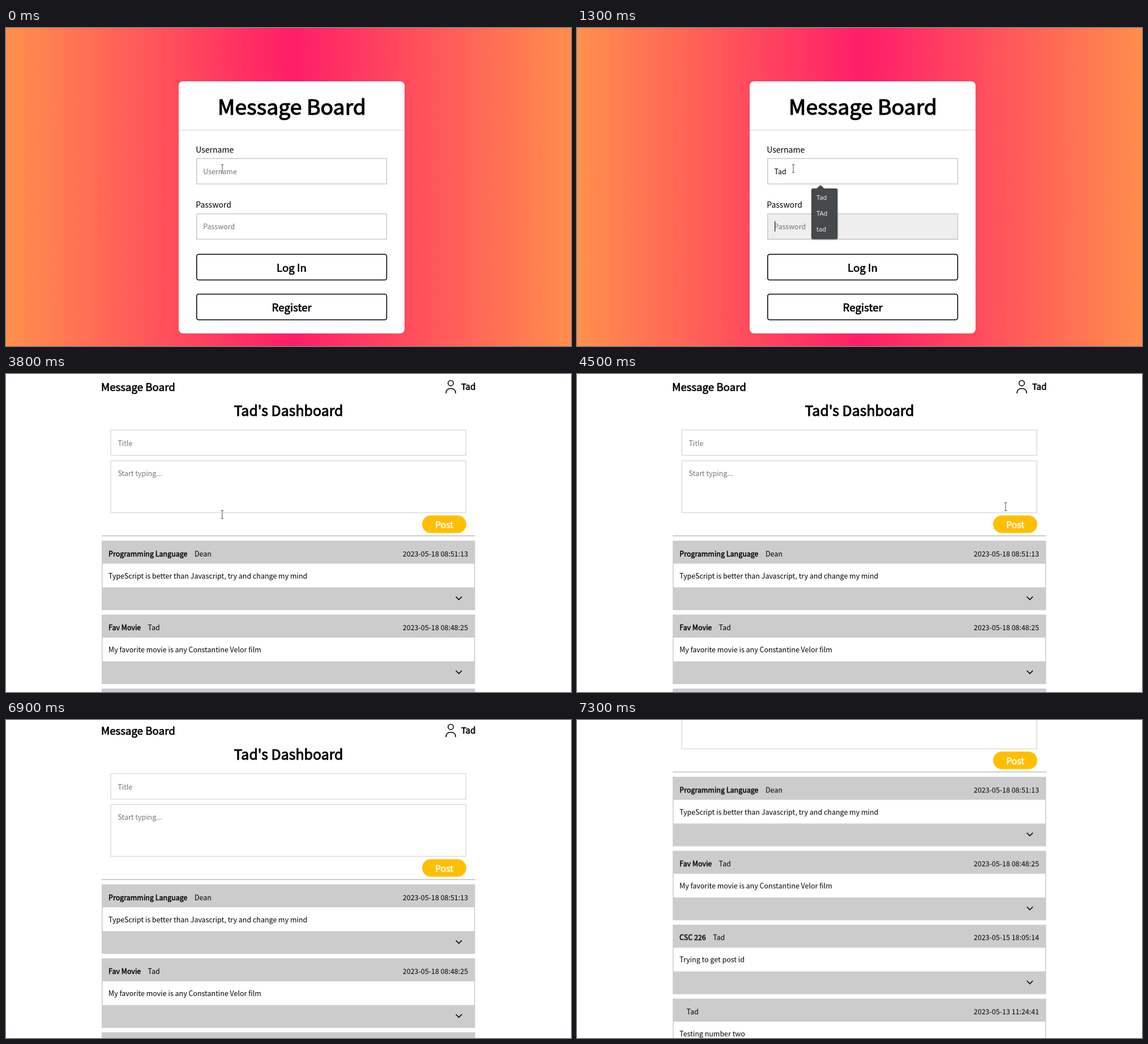
These frames come from a looping animation (998 px wide and 561 px high, 8 s). An HTML page:

```html
<!DOCTYPE html>
<html lang="en">
<head>
<meta charset="utf-8">
<title>Message Board</title>
<style>
html, body { margin: 0; width: 100%; height: 100%; overflow: hidden; background: #fff; }
svg { display: block; width: 998px; height: 561px; }
text { font: 12.475px "Noto Sans CJK JP", "Noto Sans CJK SC", "Noto Sans CJK", sans-serif; white-space: pre; }

/* regular outlines thickened, like a browser's synthetic bold */
.bold { stroke: currentColor; stroke-width: .037em; stroke-linejoin: round; }
.s14 { font-size: 14.03px; }
.s15 { font-size: 14.97px; }
.s16 { font-size: 15.6px; }
.s19 { font-size: 18.71px; }
.s25 { font-size: 24.95px; }
.s37 { font-size: 37.43px; stroke-width: .032em; }
.mid { text-anchor: middle; }
.end { text-anchor: end; }
.hint { fill: #757575; }
.field { fill: #fff; stroke: #ccc; stroke-width: 1.56; }
.pale { stroke: #ddd; }
.btn { fill: #fff; stroke: #000; stroke-width: 1.56; }
.line { fill: none; stroke: #000; stroke-width: 1.6; }
.menu text { font: 11.2px "Noto Sans", sans-serif; fill: #eee; }
.menu { filter: drop-shadow(0 1px 1px #0005); }

.anim { animation: 8s step-end infinite; }
.off { opacity: 0; }
.login { animation-name: login; }
.dash { animation-name: dash; }
.name-focus { animation-name: name-focus; }
.name-hint, .wide { animation-name: name-hint; }
.name-text, .narrow { animation-name: name-text; }
.name-caret { animation-name: name-caret; }
.pass-focus { animation-name: pass-focus; }
.pass-hint { animation-name: pass-hint; }
.pass-caret { animation-name: pass-caret; }
.menu { animation-name: menu; }
.page { animation-name: scroll; }
.pointer { animation-name: pointer; }
.beam { animation-name: beam; }
.arrow { animation-name: arrow; }

@keyframes login { 47.5% { opacity: 0; } }
@keyframes dash { 47.5% { opacity: 1; } }
@keyframes name-focus { 3.75% { opacity: 1; } 16.25% { opacity: 0; } }
@keyframes name-hint { 8.75% { opacity: 0; } }
@keyframes name-text { 8.75% { opacity: 1; } }
@keyframes name-caret {
  8.75% { transform: translateX(7px); }
  11.25% { transform: translateX(13.7px); }
  13.75% { transform: translateX(21.6px); }
}
@keyframes pass-focus { 16.25% { opacity: 1; } }
@keyframes pass-hint { 17.5% { opacity: 0; } }
@keyframes pass-caret {
  17.5% { transform: translateX(4.25px); }
  20% { transform: translateX(8.5px); }
  22.5% { transform: translateX(12.75px); }
  25% { transform: translateX(17px); }
  27.5% { transform: translateX(21.25px); }
  30% { transform: translateX(25.5px); }
  32.5% { transform: translateX(29.5px); }
}
@keyframes menu {
  3.75% { opacity: .95; }
  16.25% { opacity: .95; animation-timing-function: steps(4); }
  21.25% { opacity: 0; }
}
@keyframes scroll {
  86.25% { transform: translateY(-4px); }
  87.5% { transform: translateY(-45px); }
  88.75% { transform: translateY(-115px); }
  90% { transform: translateY(-170px); }
  91.25% { transform: translateY(-193.8px); }
}
@keyframes pointer {
  0% { transform: translate(382px, 248px); }
  48.75% { transform: translate(405px, 243px); }
  50% { transform: translate(455px, 232px); }
  51.25% { transform: translate(515px, 220px); }
  52.5% { transform: translate(568px, 210px); }
  55% { transform: translate(690px, 237px); }
  56.25% { transform: translate(757px, 234px); }
  63.75% { transform: translate(768px, 231px); }
  65% { transform: translate(785px, 224px); }
  66.25% { transform: translate(811px, 212px); }
  67.5% { transform: translate(845px, 199px); }
  68.75% { transform: translate(880px, 187px); }
  70% { transform: translate(899.5px, 180px); }
  75% { transform: translate(922px, 183px); }
  76.25% { transform: translate(957px, 181px); }
  77.5% { transform: translate(987.5px, 177px); }
  80%, 100% { transform: translate(1020px, 177px); }
}
@keyframes beam { 67.5% { opacity: 0; } }
@keyframes arrow { 67.5% { opacity: 1; } }
</style>
</head>
<body>
<svg viewBox="0 0 998 561">
  <defs>
    <linearGradient id="sunset" gradientUnits="userSpaceOnUse" x1="0" x2="1009">
      <stop offset="0" stop-color="#ff904c"/>
      <stop offset=".5" stop-color="#ff1d68"/>
      <stop offset="1" stop-color="#ff904c"/>
    </linearGradient>
  </defs>

  <g class="anim login">
    <rect width="998" height="561" fill="url(#sunset)"/>
    <rect x="305" y="94" width="399" height="444.7" rx="7.8" fill="#fff"/>
    <path d="M305 180.2H704" stroke="#ddd" stroke-width="1.2"/>
    <text class="bold mid s37" x="505" y="153">Message Board</text>

    <text class="s14" x="335.2" y="219.7">Username</text>
    <rect class="field" x="336.8" y="230.3" width="335.6" height="44.8"/>
    <rect class="field anim off name-focus" style="fill:#eee" x="336.8" y="230.3" width="335.6" height="44.8"/>
    <text class="anim off name-text" x="348.6" y="258">Tad</text>
    <g class="anim off name-focus">
      <g class="anim name-caret">
        <rect x="349" y="243" width="40" height="19" fill="#eee"/>
        <rect x="348.8" y="244" width="1.1" height="18"/>
      </g>
    </g>
    <text class="hint anim name-hint" x="348.2" y="258">Username</text>

    <text class="s14" x="335.2" y="317">Password</text>
    <rect class="field" x="336.8" y="327.8" width="335.6" height="44.8"/>
    <g class="anim off pass-focus">
      <rect class="field" style="fill:#eee" x="336.8" y="327.8" width="335.6" height="44.8"/>
      <path d="M351.3 351.6h25.6" fill="none" stroke="#000" stroke-width="3.6" stroke-linecap="round" stroke-dasharray="0 4.25"/>
      <g class="anim pass-caret">
        <rect x="349.2" y="340" width="40" height="20" fill="#eee"/>
        <rect x="349" y="341" width="1.1" height="18"/>
      </g>
    </g>
    <text class="hint anim pass-hint" x="348.2" y="355.4">Password</text>

    <rect class="btn" x="336.8" y="399.3" width="335.6" height="45.2" rx="3.5"/>
    <text class="bold mid s19" x="504.5" y="429.7">Log In</text>
    <rect class="btn" x="336.8" y="469.5" width="335.6" height="45.2" rx="3.5"/>
    <text class="bold mid s19" x="504.7" y="499.9">Register</text>

    <g class="anim off menu">
      <path d="M423 283.5L430 277L437 283.5Z" fill="#3b4043"/>
      <g class="anim wide">
        <rect x="414" y="283" width="177" height="173" rx="3" fill="#3b4043"/>
        <text x="423" y="386.6">Dean</text>
        <text x="423" y="414.4">message board tester</text>
        <text x="423" y="442.2">test</text>
      </g>
      <rect class="anim off narrow" x="414" y="283" width="46.3" height="89.5" rx="3" fill="#3b4043"/>
      <text x="423" y="303">Tad</text>
      <text x="423" y="330.9">TAd</text>
      <text x="423" y="358.8">tad</text>
    </g>
  </g>

  <g class="anim off dash">
    <rect width="998" height="561" fill="#fff"/>
    <g class="anim page">
      <text class="bold s19" x="168" y="29.8">Message Board</text>
      <circle class="line" cx="785.6" cy="16.2" r="4.7"/>
      <path class="line" d="M777.3 34.3v-1.6a7 7 0 0 1 7-7h2.8a7 7 0 0 1 7 7v1.6"/>
      <text class="bold end s15" x="829.5" y="28">Tad</text>
      <text class="bold mid s25" x="499" y="74.2">Tad's Dashboard</text>
      <rect class="field pale" x="185.2" y="98.6" width="627" height="45"/>
      <text class="hint" x="197.4" y="126.6">Title</text>
      <rect class="field pale" x="185.2" y="153.2" width="627" height="91.4"/>
      <text class="hint" x="197.4" y="180.2">Start typing...</text>
      <rect x="735" y="249.5" width="78" height="31" rx="15.5" fill="#ffbf00"/>
      <text class="bold mid s16" x="774.2" y="271.7" fill="#fff" color="#fff">Post</text>
      <path d="M169 285.5H828.6" stroke="#bbb" stroke-width="1.6"/>
      <g id="posts"></g>
    </g>
  </g>

  <g class="anim pointer">
    <g class="anim beam" fill="none">
      <path d="M-2.5 -7H2.5M0 -7V7M-2.5 7H2.5" stroke="#fff" stroke-width="2.4" opacity=".7"/>
      <path d="M-2.5 -7H2.5M0 -7V7M-2.5 7H2.5" stroke="#555"/>
    </g>
    <path class="anim off arrow" d="M.3 .3V13.2L3 11L4.6 14.6L7.2 13.4L5.8 10L8.9 9.3Z" fill="#444749" stroke="#ddd" stroke-width=".5"/>
  </g>
</svg>
<script>
const posts = [
  ["Programming Language", "Dean", "2023-05-18 08:51:13", "TypeScript is better than Javascript, try and change my mind"],
  ["Fav Movie", "Tad", "2023-05-18 08:48:25", "My favorite movie is any Constantine Velor film"],
  ["CSC 226", "Tad", "2023-05-15 18:05:14", "Trying to get post id"],
  ["", "Tad", "2023-05-13 11:24:41", "Testing number two"]
];

const postMarkup = ([title, author, date, body], i) => `
  <g transform="translate(169 ${294 + i * 130.45})">
    <rect width="659.6" height="122.6" fill="#ccc"/>
    <rect x="1.56" y="40.6" width="656.5" height="41.8" fill="#fff"/>
    <text x="12.1" y="27.6"><tspan class="bold">${title}</tspan><tspan dx="12.475">${author}</tspan></text>
    <text class="end" x="647.1" y="27.6">${date}</text>
    <text x="12.1" y="66.6">${body}</text>
    <path class="line" d="M625.6 98.8l5.3 5.3l5.3 -5.3"/>
  </g>`;

document.getElementById("posts").innerHTML = posts.map(postMarkup).join("");
</script>
</body>
</html>
```
